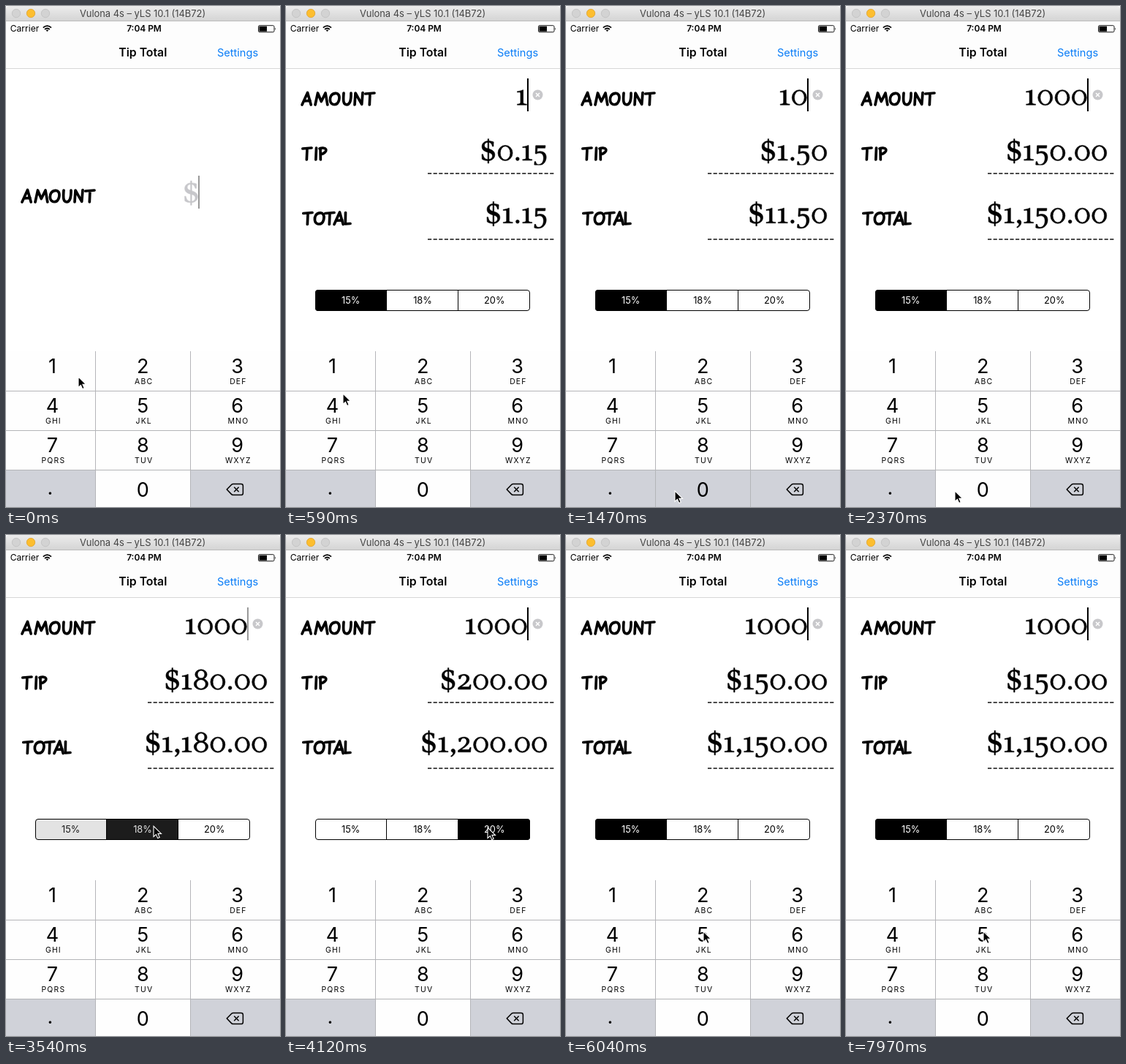
An HTML page that plays this animation: 375 by 685 pixels, repeating every 8000 ms.

```html
<!DOCTYPE html>
<html lang="en">
<head>
<meta charset="utf-8">
<title>Tip Total</title>
<style>
  html, body { margin: 0; width: 100%; height: 100%; overflow: hidden; background: #fff; }
  svg { display: block; width: 375px; height: 685px; }
  text { font-family: Inter, Roboto, sans-serif; text-anchor: middle; }
  .marker path { fill: none; stroke: #000; stroke-width: 3.7; stroke-linecap: round; stroke-linejoin: round; }
  .digit { font-size: 27px; }
  .letters { font-size: 10.4px; letter-spacing: 1.2px; }
  .seg text { font-size: 12.8px; }
  .dash { stroke: #111; stroke-width: 1.5; stroke-dasharray: 5.2 2.4; }
</style>
</head>
<body>
<svg viewBox="0 0 375 685">
  <defs>
    <linearGradient id="chrome" x2="0" y2="1">
      <stop stop-color="#ececec"/><stop offset="1" stop-color="#d4d4d4"/>
    </linearGradient>
    <clipPath id="tipClip"><path d="M150 170H375V217.5H150Z"/></clipPath>
    <clipPath id="totalClip"><path d="M150 255H375V305H150Z"/></clipPath>
    <clipPath id="segClip"><rect x="40" y="388" width="294" height="29" rx="4"/></clipPath>
  </defs>

  <path d="M0 20.5V5Q0 0 5 0H370Q375 0 375 5V20.5Z" fill="url(#chrome)"/>
  <path d="M0 20.5H375" stroke="#bdbdbd"/>
  <g stroke-width=".8">
    <circle cx="14" cy="10" r="5.7" fill="#d3d3d3" stroke="#c0c0c0"/>
    <circle cx="34" cy="10" r="5.7" fill="#fdbe2f" stroke="#e0a32a"/>
    <circle cx="54" cy="10" r="5.7" fill="#d3d3d3" stroke="#c0c0c0"/>
  </g>
  <text x="187" y="15" font-size="12.9" fill="#444">Vulona 4s – yLS 10.1 (14B72)</text>

  <path d="M0 21H375V85H0Z" fill="#fdfdfd"/>
  <path d="M0 85.5H375" stroke="#d6d6d6"/>
  <text x="25.5" y="35.4" font-size="12.1">Carrier</text>
  <g fill="none" stroke="#000" stroke-width="1.7">
    <path d="M50.8 29.6Q56.4 24.6 62 29.6M53 32Q56.4 29 59.8 32"/>
    <path d="M54.6 33.2Q56.4 31.8 58.2 33.2L56.4 35Z" fill="#000" stroke="none"/>
  </g>
  <text x="189" y="35.4" font-size="11.9" font-weight="600">7:04 PM</text>
  <rect x="345.5" y="26.7" width="21.5" height="9" rx="1.6" fill="none" stroke="#000" stroke-width=".9"/>
  <path d="M346.5 27.7H357V34.7H346.5Z"/>
  <path d="M368 29.5Q369.6 31.2 368 33Z"/>
  <text x="187.3" y="69" font-size="15.8" font-weight="600">Tip Total</text>
  <text x="317" y="68.6" font-size="14.6" fill="#087cf7">Settings</text>

  <g id="amountRow">
    <g class="marker" data-word="AMOUNT" data-x="20 38 58 77 92 107" data-y="116.5"></g>
    <g id="amount" role="img"></g>
    <rect id="caret" y="99" width="2" height="45"/>
    <g id="clear">
      <circle cx="344.5" cy="121.5" r="7" fill="#c8c8cb"/>
      <path d="M342 119l5 5m0-5l-5 5" stroke="#fff" stroke-width="1.5"/>
    </g>
  </g>

  <g id="results">
    <g class="marker" data-word="TIP" data-x="21 38 44" data-y="191.5"></g>
    <g id="tip" role="img" clip-path="url(#tipClip)"></g>
    <path class="dash" d="M194 229H367"/>
    <g class="marker" data-word="TOTAL" data-x="22 37 52 64 79" data-y="280"></g>
    <g id="total" role="img" clip-path="url(#totalClip)"></g>
    <path class="dash" d="M194 319H367"/>
    <g class="seg" id="seg" clip-path="url(#segClip)"></g>
    <rect x="40.5" y="388.5" width="293" height="28" rx="3.5" fill="none" stroke="#000"/>
    <path d="M137.5 388V417M235.5 388V417" stroke="#000"/>
  </g>

  <g id="keys"></g>
  <path d="M122.5 472V685M252.5 472V685M0 526.5H375M0 580.5H375M0 634.5H375" stroke="#b4b5b8"/>
  <g fill="none" stroke="#000" stroke-width="1.5" stroke-linejoin="round">
    <path d="M302.2 661L308.6 654.4Q309.6 653.4 311 653.4H321.8Q324.4 653.4 324.4 656V666Q324.4 668.6 321.8 668.6H311Q309.6 668.6 308.6 667.6Z"/>
    <path d="M312.2 657.8l6.4 6.4m0-6.4l-6.4 6.4"/>
  </g>
  <path id="pointer" d="M0 0V14.4L3.4 11.3L5.7 16.6L8.2 15.5L5.9 10.4H10.5Z" stroke="#fff" stroke-width="1.1"/>
</svg>

<script>
const $ = id => document.getElementById(id);
const gray = v => `rgb(${Array(3).fill(Math.round(v))})`;

// Felt-pen capitals, drawn as strokes
const felt = {
  A: 'M2 18.5L9.5 2L14.2 18.5M4.5 13.5L13 12.8',
  M: 'M2 18.5L5.5 2.5L10.3 14L16 2.5L18.8 18.5',
  O: 'M10 2.8C4 3 2 8 2.4 12.5C3 20 12.5 20.5 14.6 12C16 6 13.5 2 8.5 3.2',
  U: 'M2 2.5C1 13 1.5 18.3 6 18.3C11 18.3 12.2 11 12 2.5',
  N: 'M2 18.5L3 2.5L11.7 17.8L13 2',
  T: 'M1.8 3.5L14 2.5M8 3L7.3 18.5',
  I: 'M3.5 2.5L2.8 18.5',
  P: 'M3 3L3.3 18.5M2 3.5C13 0 14 9 3.5 11.5',
  L: 'M2.5 2.5L2.2 18L9 17.5'
};
for (const g of document.querySelectorAll('.marker')) {
  const { word, x, y } = g.dataset, xs = x.split(' ');
  g.setAttribute('role', 'img');
  g.setAttribute('aria-label', word);
  g.innerHTML = [...word].map((c, i) => `<path transform="translate(${xs[i]} ${y})" d="${felt[c]}"/>`).join('');
}

// Old-style serif numerals on a 1000-unit em: [advance, outline]
const oval = (cx, cy, rx, ry, dir = 1) =>
  `M${cx - rx} ${cy}a${rx} ${ry} 0 0 ${dir} ${2 * rx} 0a${rx} ${ry} 0 0 ${dir} ${-2 * rx} 0Z`;
const serif = {
  0: [613, oval(306, -264, 264, 278) + oval(306, -264, 180, 242, 0)],
  1: [429, 'M48 0V-30C125-37 165-40 165-85V-405C165-448 150-460 118-460L48-455V-486C130-498 200-515 248-540H262V-85C262-40 310-37 388-30V0Z'],
  2: [559, 'M48 0V-58C190-160 355-250 355-385C355-460 315-503 245-503C180-503 150-465 132-375H82L70-480C120-515 185-541 262-541C375-541 450-480 450-395C450-260 300-190 165-85H400C445-85 455-105 475-165H512L495 0Z'],
  5: [528, 'M90-530H440L430-442H148L140-302C170-314 210-322 250-322C385-322 470-240 470-115C470 60 345 190 175 190C120 190 70 180 40 165L48 45H90C105 120 130 152 190 152C300 152 370 60 370-85C370-200 310-262 225-262C175-262 130-250 100-232L76-245Z'],
  8: [596, oval(298, -535, 215, 180) + oval(298, -190, 255, 205) + oval(300, -537, 128, 142, 0) + oval(298, -186, 165, 164, 0)],
  $: [610, 'M495-660L490-500H452C435-590 390-650 300-650C215-650 165-605 165-540C165-475 205-445 310-415C455-375 540-320 540-200C540-75 440 15 295 15C210 15 135-8 80-45L72-215H112C135-95 190-30 300-30C395-30 452-80 452-155C452-235 395-262 290-290C150-325 75-385 75-495C75-610 170-695 305-695C380-695 445-680 495-660ZM285-770H325V105H285Z'],
  '.': [270, oval(135, -52, 62, 62)],
  ',': [270, 'M135-115C190-115 215-70 215-25C215 60 160 130 70 170L55 140C110 110 140 70 140 10C100 10 70-15 70-55C70-90 95-115 135-115Z']
};
function write(id, str, right, base, color = '#000') {
  const size = .038;
  let x = 0;
  const body = [...str].map(c => {
    const [adv, d] = serif[c], p = `<path transform="translate(${x})" d="${d}"/>`;
    x += adv;
    return p;
  }).join('');
  $(id).setAttribute('aria-label', str);
  $(id).innerHTML = `<g fill="${color}" stroke="${color}" stroke-width="16" transform="translate(${right - x * size} ${base}) scale(${size})">${body}</g>`;
}

const letters = ['', 'ABC', 'DEF', 'GHI', 'JKL', 'MNO', 'PQRS', 'TUV', 'WXYZ'];
const colX = [0, 123, 253, 375], mid = [63.5, 187.3, 316.5];
const keyUp = '#fefefe', keyDown = '#d0d2d9';
$('keys').innerHTML = [...'123456789.0<'].map((c, i) => {
  const col = i % 3, top = 472 + 54 * Math.floor(i / 3);
  const fill = c === '.' || c === '<' ? keyDown : keyUp;
  const face = `<rect id="key${i}" x="${colX[col]}" y="${top}" width="${colX[col + 1] - colX[col]}" height="54" fill="${fill}"/>`;
  if (c === '<') return face;
  const x = c === '.' ? 60.5 : mid[col], y = top + (c === '.' ? 33.5 : c === '0' ? 37 : 30);
  return face + `<text class="digit" x="${x}" y="${y}">${c}</text>` +
    (letters[i] ? `<text class="letters" x="${mid[col] + 1.4}" y="${top + 45}">${letters[i]}</text>` : '');
}).join('');

const rates = [15, 18, 20];
const money = v => '$' + v.toLocaleString('en-US', { minimumFractionDigits: 2, maximumFractionDigits: 2 });

// Each step keeps what the one before it set
const steps = [
  [0, { at: [99, 507], caret: .4, amount: '', open: 0, key: -1, sel: 0, prev: 0, mix: 1, press: -1 }],
  [140, { at: [78, 501], caret: 0 }],
  [290, { at: [68, 497], key: 0 }],
  [440, { key: -1, amount: '1', open: .5, caret: 1 }],
  [590, { at: [78, 530], open: 1 }],
  [730, { at: [112, 600] }],
  [880, { at: [140, 646] }],
  [1020, { at: [149, 663] }],
  [1170, { key: 10 }],
  [1320, { key: -1, amount: '10' }],
  [1470, { key: 10 }],
  [1620, { key: -1, amount: '100' }],
  [1770, { key: 10 }],
  [1920, { key: -1, amount: '1000' }],
  [2520, { at: [158, 590], caret: .4 }],
  [2660, { at: [178, 492], caret: 0 }],
  [2950, { at: [190, 450], caret: .4 }],
  [3100, { at: [201, 405], caret: 1 }],
  [3250, { at: [202, 398] }],
  [3390, { press: 1 }],
  [3540, { press: -1, sel: 1, prev: 0, mix: .89, caret: .4 }],
  [3690, { at: [240, 399], mix: 1, caret: 0 }],
  [3830, { at: [276, 400], press: 2 }],
  [3970, { press: -1, sel: 2, prev: 1, mix: .89, caret: .4 }],
  [4120, { mix: 1, caret: 1 }],
  [4270, { at: [240, 401] }],
  [4410, { at: [160, 400], caret: .4 }],
  [4560, { at: [116, 400], caret: 0 }],
  [4850, { press: 0 }],
  [5000, { press: -1, sel: 0, prev: 2, mix: .89, caret: .4 }],
  [5150, { mix: 1, caret: 1 }],
  [5300, { at: [126, 404] }],
  [5450, { at: [150, 420], caret: .4 }],
  [5600, { at: [171, 442], caret: 0 }],
  [5890, { at: [182, 505], caret: .4 }],
  [6040, { at: [188, 542], caret: 1 }],
  [6490, { caret: .4 }],
  [6640, { caret: 0 }],
  [6940, { caret: .4 }],
  [7090, { caret: 1 }],
  [7380, { caret: .4 }],
  [7530, { caret: 0 }],
  [7970, { caret: 1 }]
];
let acc = {};
const states = steps.map(([time, change]) => ({ time, ...(acc = { ...acc, ...change }) }));

function segments({ sel, prev, mix, press }) {
  $('seg').innerHTML = rates.map((rate, i) => {
    const dark = i === sel ? mix : i === prev ? 1 - mix : 0;
    const fill = i === press ? 214 : 255 * (1 - dark);
    return `<rect x="${40 + 98 * i - (i ? .5 : 0)}" y="388" width="98.5" height="29" fill="${gray(fill)}"/>` +
      `<text x="${88.7 + 98.3 * i}" y="407.3" fill="${gray(255 * dark)}">${rate}%</text>`;
  }).join('');
}

function draw(s) {
  const sum = Number(s.amount), tip = sum * rates[s.sel] / 100, typed = s.amount !== '';
  $('amountRow').setAttribute('transform', `translate(0 ${133 * (1 - s.open)})`);
  $('results').setAttribute('opacity', s.open);
  $('clear').setAttribute('opacity', typed ? 1 : 0);
  write('amount', s.amount || '$', typed ? 331 : 265, 135.3, typed ? '#000' : '#c7c7cb');
  write('tip', money(tip), 358.4, 211);
  write('total', money(sum + tip), 358.4, 296.8);
  $('caret').setAttribute('x', typed ? 330 : 263);
  $('caret').setAttribute('opacity', s.caret);
  for (const k of [0, 10]) $('key' + k).setAttribute('fill', s.key === k ? keyDown : keyUp);
  $('pointer').setAttribute('transform', `translate(${s.at})`);
  segments(s);
}

const start = performance.now();
let shown;
function tick(now) {
  const t = Math.max(0, now - start) % 8000;
  const state = states.findLast(s => s.time <= t);
  if (state !== shown) draw(shown = state);
  requestAnimationFrame(tick);
}
tick(start);
</script>
</body>
</html>
```
